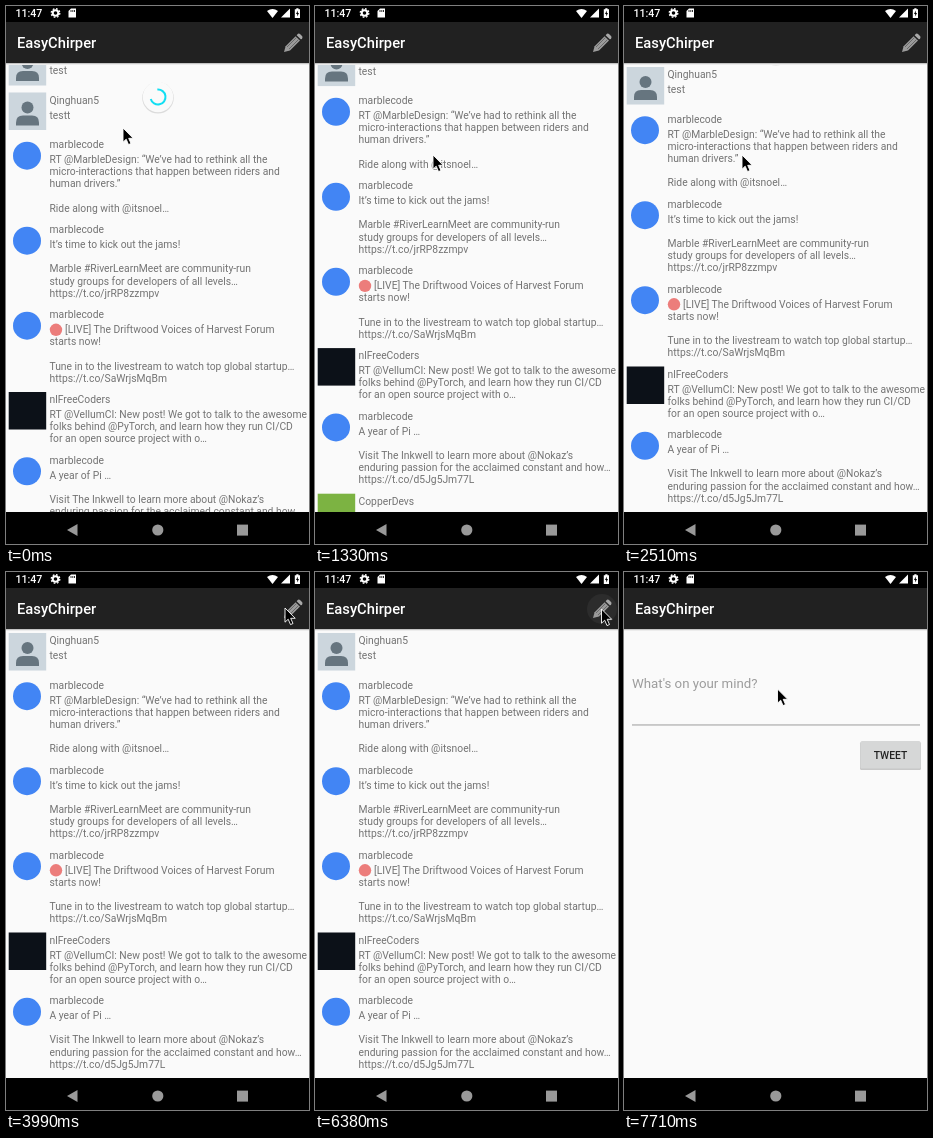
Animation, 303 px wide and 538 px high, one loop 8000 ms. Source, as an HTML page:

```html
<!DOCTYPE html>
<html lang="en">
<head>
<meta charset="utf-8">
<title>Feed refresh and compose</title>
<style>
  html, body { margin: 0; width: 100%; height: 100%; overflow: hidden; background: #fafafa; }
  svg { display: block; width: 100%; height: 100%; }
  text { font: 10.32px Roboto, sans-serif; fill: #737373; white-space: pre; }
  .title { font-size: 14.74px; font-weight: 500; fill: #fff; }
  .clock { font-size: 10.6px; font-weight: 500; fill: #fff; }
  .hint { font-size: 13.27px; fill: #9c9c9c; }
  .button { font-weight: 500; fill: #222; text-anchor: middle; }
</style>
</head>
<body>
<svg id="stage" viewBox="0 0 303 538"></svg>
<script>
const LOOP = 8000, LINE = 12.2, MIN_ROW = 44.5;

const text = (x, y, content, cls = '') => `<text x="${x}" y="${y}" class="${cls}">${content}</text>`;
const rect = (x, y, w, h, fill, extra = '') =>
  `<rect x="${x}" y="${y}" width="${w}" height="${h}" fill="${fill}" ${extra}/>`;
const circle = (x, y, r, fill, extra = '') =>
  `<circle cx="${x}" cy="${y}" r="${r}" fill="${fill}" ${extra}/>`;
const path = (d, fill, extra = '') => `<path d="${d}" fill="${fill}" ${extra}/>`;

// Avatars share a 37.5 px box whose top is at y = 0.
const avatars = {
  person: rect(2.7, 0, 37.5, 37.5, '#ccd6dd') + circle(21.5, 15, 6, '#66757f') +
    path('M10 33V30Q10 23 17 23H26Q33 23 33 30V33Z', '#66757f'),
  blue: circle(21, 18.7, 14, '#4285f4'),
  dark: rect(2.7, 0, 37.5, 37.5, '#0c1118'),
  green: rect(2.7, 0, 37.5, 37.5, '#7cb342')
};

const posts = [
  ['blue', 'marblecode', 'RT @MarbleDesign: “We’ve had to rethink all the',
    'micro-interactions that happen between riders and', 'human drivers.”', '', 'Ride along with @itsnoel…'],
  ['blue', 'marblecode', 'It’s time to kick out the jams!', '',
    'Marble #RiverLearnMeet are community-run', 'study groups for developers of all levels…',
    'https://t.co/jrRP8zzmpv'],
  ['blue', 'marblecode', '*[LIVE] The Driftwood Voices of Harvest Forum', 'starts now!', '',
    'Tune in to the livestream to watch top global startup…', 'https://t.co/SaWrjsMqBm'],
  ['dark', 'nlFreeCoders', 'RT @VellumCI: New post! We got to talk to the awesome',
    'folks behind @PyTorch, and learn how they run CI/CD', 'for an open source project with o…'],
  ['blue', 'marblecode', 'A year of Pi …', '', 'Visit The Inkwell to learn more about @Nokaz’s',
    'enduring passion for the acclaimed constant and how…', 'https://t.co/d5Jg5Jm77L'],
  ['green', 'CopperDevs', '']
];

function row([avatar, name, ...lines], top) {
  const body = lines.map((line, i) => {
    const y = 26 + i * LINE, marked = line.startsWith('*');
    return marked ? circle(50, y - 3.2, 6.2, '#ec7d7b') + text(59, y, line.slice(1)) : text(43.5, y, line);
  }).join('');
  return `<g transform="translate(0 ${top})"><g class="${avatar}">${avatars[avatar]}</g>` +
    text(43.5, 11.3, name) + body + '</g>';
}

function rows(items, top) {
  return items.map(item => {
    const html = row(item, top);
    top += Math.max(MIN_ROW, 24 + LINE * (item.length - 2));
    return html;
  }).join('');
}

const toolbar = rect(0, 57, 303, 1, '#c4c4c4') + rect(0, 58, 303, 1, '#ececec') +
  rect(0, 0, 303, 57, '#212121') + text(11, 42.3, 'EasyChirper', 'title');

const pencil = path('M278 46L279.6 40.2 289.6 30.2 294 34.6 284 44.6Z', '#9b9b9b') +
  path('M290.6 29.2L292 27.8Q293 27 294 28L296 30Q297 31 296.2 32.2L295 33.6Z', '#a8a8a8') +
  path('M281 41L290.5 31.5M283 43L292.5 33.5', 'none', 'stroke="#5c5c5c" stroke-width=".8"');

const compose = rect(0, 0, 303, 538, '#fafafa') + toolbar +
  text(8, 116, 'What\'s on your mind?', 'hint') + rect(8, 152.3, 288, 1.3, '#b2b2b2') +
  rect(236, 170, 61, 28, '#000', 'rx="1.5" opacity=".2"') +
  rect(236.5, 169, 60, 27.5, '#d6d7d7', 'rx="1.5"') + text(266.5, 187, 'TWEET', 'button');

const statusBar = rect(0, 0, 303, 16, '#000') + text(9.5, 11, '11:47', 'clock') +
  circle(49.5, 7, 2.8, 'none', 'stroke="#fff" stroke-width="2"') +
  circle(49.5, 7, 4.3, 'none', 'stroke="#fff" stroke-width="1.3" stroke-dasharray="1.7 1.68"') +
  path('M65 2.5H70V11.5H62.5V5Z', '#fff') +
  path('M65 4V6M66.8 4V6M68.5 4V6', 'none', 'stroke="#000" stroke-width=".8"') +
  path('M266.5 12L261 5Q266.5 .8 272 5Z', '#fff') + path('M284 2.5V11.5H275Z', '#fff') +
  path('M290.3 2.3H292.5V3.2H294V12H288.8V3.2H290.3Z', '#fff') +
  path('M291.8 4.5L290 8H291.2V10.5L293 7H291.8Z', '#000');

const navBar = rect(0, 506, 303, 32, '#000') + path('M61 524L71.5 518V530Z', '#999') +
  circle(151.8, 524, 5.6, '#999') + rect(231, 518.6, 11, 11, '#999');

stage.innerHTML = rect(0, 0, 303, 538, '#fafafa') +
  `<g id="list">${row(['person', 'Qinghuan5', 'test'], 61)}
    <g id="extra">${row(['person', 'Qinghuan5', 'testt'], 61 + MIN_ROW)}</g>
    <g id="rest">${rows(posts, 61 + MIN_ROW)}</g></g>
  <g id="spinner">${circle(0, .8, 15.8, '#000', 'opacity=".12"')}${circle(0, 0, 15.2, '#fafafa')}
    <path id="arc" fill="none" stroke="#12dff3" stroke-width="2"/></g>
  ${toolbar}${circle(287, 37, 15, '#fff', 'id="ripple"')}${pencil}
  <g id="compose">${compose}</g>${statusBar}${navBar}
  <g id="cursor">${path('M0 0V14.2L3.2 11.2 5.5 16.6 8 15.5 5.7 10.3H10.2Z', '#000',
    'stroke="#fff" stroke-width=".9"')}</g>`;

// Each track lists [time, ...values]; values hold until the next entry.
const tracks = {
  cursor: [[0, 117, 122], [880, 118, 136], [1030, 118, 149], [3550, 148, 132], [3700, 208, 90],
    [3840, 262, 49], [3990, 279, 36], [5040, 287, 36.5], [5340, 286.5, 37],
    [7560, 205, 82], [7710, 153.5, 117]],
  scroll: [[0, 19], [1330, 18.4], [1480, 14.5], [1630, 10.4], [1780, 7.5], [1920, 5],
    [2070, 3], [2220, 1], [2360, 0]],
  // y, scale, arc start, arc sweep
  spinner: [[0, 91, 1, -95, 260], [140, 91, 1, 10, 200], [290, 91, 1, 110, 110], [440, 91, .6, 200, 60],
    [590, 91, 0, 0, 0], [2220, 60, 1, 0, 0], [2360, 71.5, 1, 0, 0], [2510, 43, 1, 0, 0], [3550, 0, 0, 0, 0]],
  ripple: [[0, 0], [5790, .04], [5930, .07], [6080, .09], [6380, .05]],
  // opacity, vertical offset
  compose: [[0, 0, 0], [6970, .35, 22], [7120, .9, 4], [7260, 1, 0]]
};

const at = (name, t) => tracks[name].findLast(key => key[0] <= t).slice(1);
const byId = id => document.getElementById(id);
const move = (id, x, y, scale = 1) =>
  byId(id).setAttribute('transform', `translate(${x} ${y}) scale(${scale})`);

function arcPath(start, sweep, r = 7.5) {
  const point = deg => {
    const a = deg * Math.PI / 180;
    return `${r * Math.cos(a)} ${r * Math.sin(a)}`;
  };
  return sweep ? `M${point(start)}A${r} ${r} 0 ${+(sweep > 180)} 1 ${point(start + sweep)}` : '';
}

function draw(now) {
  const t = now % LOOP, reloaded = t >= 290;
  move('cursor', ...at('cursor', t));
  move('list', 0, -at('scroll', t)[0]);
  byId('extra').setAttribute('opacity', reloaded ? 0 : 1);
  move('rest', 0, reloaded ? 0 : MIN_ROW);
  document.querySelector('.green').setAttribute('opacity', t < 880 ? 0 : 1);

  const [y, scale, start, sweep] = at('spinner', t);
  move('spinner', 152, y, scale);
  byId('arc').setAttribute('d', arcPath(start, sweep));

  byId('ripple').setAttribute('opacity', at('ripple', t)[0]);
  const [opacity, offset] = at('compose', t);
  byId('compose').setAttribute('opacity', opacity);
  move('compose', 0, offset);
}

const begin = performance.now();
function tick() {
  draw(performance.now() - begin);
  requestAnimationFrame(tick);
}
tick();
</script>
</body>
</html>
```
